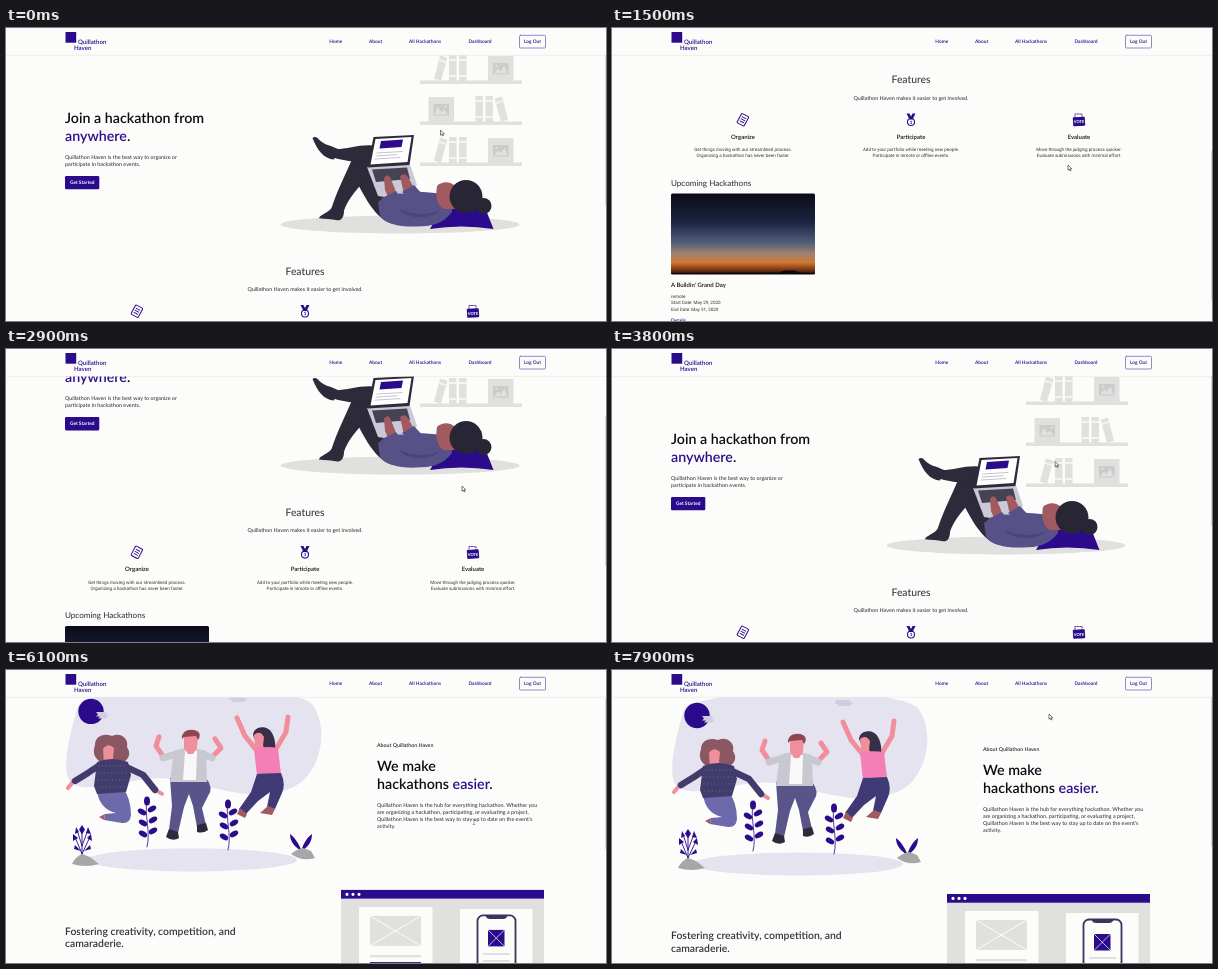
Recreate the animation shown at these times as an HTML page. Size 600x293 px, loop 8 s.

```html
<!DOCTYPE html>
<html lang="en">
<head>
<meta charset="utf-8">
<title>Quillathon Haven</title>
<style>
  html, body { margin: 0; width: 100%; height: 100%; overflow: hidden; background: #fcfcfa; }
  svg { display: block; width: 100%; height: 100%; }
  text { font: 5.4px Lato, sans-serif; fill: #2a2a2e; text-rendering: geometricPrecision; }
  .small { font: 4.55px Roboto, sans-serif; fill: #333; }
  .hero { font-size: 14.25px; font-weight: 600; fill: #0b0b14; }
  .lead { font-size: 10.4px; font-weight: 600; fill: #333338; }
  .title { font-size: 6px; font-weight: 600; fill: #111; }
  .nav { font-size: 4.8px; font-weight: 600; }
  .brand { font-size: 6.1px; font-weight: 600; }
  .mid { text-anchor: middle; }
  .ink, text.ink, tspan.ink { fill: #2b0b8b; }
  .dark { fill: #2d2b3a; }
  .skin { fill: #a05a60; }
  .pink { fill: #f08f9b; }
  .grey { fill: #e0e0df; }
  .lilac { fill: #e5e3f0; }
  .paper { fill: #fcfcfa; }
  .line { fill: none; stroke-linecap: round; stroke-linejoin: round; }
</style>
</head>
<body>
<svg viewBox="0 0 600 293">
  <defs>
    <linearGradient id="dusk" x2="0" y2="1">
      <stop offset="0" stop-color="#0b0b18"/>
      <stop offset=".35" stop-color="#1b2340"/>
      <stop offset=".6" stop-color="#4d5d78"/>
      <stop offset=".74" stop-color="#9c8273"/>
      <stop offset=".85" stop-color="#d07a33"/>
      <stop offset=".94" stop-color="#7c3612"/>
      <stop offset="1" stop-color="#1a0d0c"/>
    </linearGradient>
    <g id="shelf">
      <path class="grey" d="M414 134.500h102v3.500h-102zM443 109h7.500v25.500h-7.500zM453 109h7.500v25.500h-7.500zM434 109.500l7.500 2.200-6.500 23-7-2zM482 110h25.500v24.500h-25.500z"/>
      <path fill="#f3f3f2" d="M443 113h7.500v2h-7.500zM453 113h7.500v2h-7.500zM443 129h7.500v2h-7.500zM453 129h7.500v2h-7.500zM433 113l7.400 2.200-.6 1.800-7.300-2.200z"/>
      <path fill="#cbcbca" d="M487 117h15.500v11.500h-15.500z"/>
      <path class="grey" d="M488 127.500l4-5 2.500 2.500 4-5.500 3 8z"/>
      <circle class="grey" cx="490.500" cy="119.800" r="1.200"/>
    </g>
    <g id="sprig">
      <path class="line" stroke="#2b0b8b" stroke-width=".8" d="M0 50C4 35-3 18 0 3"/>
      <g class="ink">
        <ellipse cy="4" rx="3" ry="4.500"/>
        <ellipse cx="-5" cy="15" rx="4.600" ry="2.700" transform="rotate(30 -5 15)"/>
        <ellipse cx="5" cy="12" rx="4.600" ry="2.700" transform="rotate(-30 5 12)"/>
        <ellipse cx="-4" cy="26" rx="4.600" ry="2.700" transform="rotate(30 -4 26)"/>
        <ellipse cx="6" cy="23" rx="4.600" ry="2.700" transform="rotate(-30 6 23)"/>
        <ellipse cx="-4" cy="37" rx="4.600" ry="2.700" transform="rotate(30 -4 37)"/>
        <ellipse cx="6" cy="34" rx="4.600" ry="2.700" transform="rotate(-30 6 34)"/>
      </g>
    </g>
  </defs>
  <rect class="paper" width="600" height="293"/>

  <g id="home">
    <use href="#shelf" y="-82"/>
    <use href="#shelf" transform="matrix(-1 0 0 1 930 -41)"/>
    <use href="#shelf"/>
    <text class="hero" x="59" y="95">Join a hackathon from</text>
    <text class="hero" x="59" y="112.500"><tspan class="ink">anywhere</tspan>.</text>
    <text x="59" y="131">Quillathon Haven is the best way to organize or</text>
    <text x="59" y="138">participate in hackathon events.</text>
    <rect class="ink" x="59" y="148" width="34.300" height="13.300" rx="1.300"/>
    <text class="nav mid" x="76.200" y="156.400" style="fill:#fff;font-weight:700">Get Started</text>

    <ellipse class="grey" cx="394" cy="196.500" rx="119.500" ry="9"/>
    <path class="ink" d="M424 201L437 178Q455 185 478 177L487.500 201Q455 196 424 201z"/>
    <g class="dark">
      <path d="M347 128C361 127 374 142 380 164L401 182 388 196C371 194 356 166 346 143z"/>
      <path d="M347 129C338 150 330 165 325 182L337.500 184C342 170 352 160 362 149z"/>
      <path d="M327 178L338 183C338 188 336 193 331 192.300 325 191 319 191 313 190.300 314 186 322 186 327 178z"/>
      <path d="M327 121C341 122 354 115 372 118L372 134C355 134 341 134 327 129.500z"/>
      <path d="M306.500 110Q309 108 311.500 110C317 117 324 117 332 121L328 131.500C318 131 311 122 306.500 110z"/>
    </g>
    <path fill="#cbc9d8" d="M361 139L404 136.500 411 157 398 172 372 168z"/>
    <path fill="#454252" d="M366 141.500L401 139.500 404 151 370 154z"/>
    <path fill="#2d2b3a" d="M367.500 109L408 107 403.500 137 361.500 139.500z"/>
    <path fill="#fff" d="M369.500 111L405.500 109 401.500 134 364.500 136.500z"/>
    <path class="ink" d="M375 113L397 111.500 395.500 119 373.500 120.500z"/>
    <path class="line" stroke="#c5c4cd" stroke-width="1" d="M371 125L396 123.500M370 128L391 126.700M369 131L394 129.500"/>
    <path fill="#565187" d="M372 174C379 167 391 164 399 166 411 161 430 166 446 167L446 184C437 196 426 198.500 410 198.500 394 199 379 196 374 188z"/>
    <path fill="#4a4678" d="M391 180C406 187 420 188 434 182 424 192 402 192 391 180z"/>
    <g class="skin">
      <path d="M378 150Q381 145 384 149L389 161 391 170 383 171 379 162z"/>
      <path d="M394 148Q399 144 402 149L408 160 405 168 398 166z"/>
      <path d="M431 158C437 152 445 154 449 158L455 181 438 181Q428 176 431 158z"/>
    </g>
    <path fill="#565187" d="M376 170L390 163 400 178 388 185zM396 164L408 157 419 169 410 178z"/>
    <circle fill="#282635" cx="460" cy="168.500" r="16.500"/>
    <circle fill="#282635" cx="477.500" cy="178" r="8"/>

    <text class="mid" x="299" y="246.700" style="font-size:10.400px">Features</text>
    <text class="mid" x="299" y="263.300">Quillathon Haven makes it easier to get involved.</text>
    <g class="line" stroke="#2b0b8b" transform="rotate(28 131 283)">
      <rect x="127" y="278" width="8" height="10.500" rx=".8" stroke-width="1"/>
      <path stroke-width=".9" d="M129 281h4M129 283.300h4M129 285.600h4"/>
    </g>
    <path class="ink" d="M294.500 277h3l1.500 3 1.500-3h3l-3 6h-3z"/>
    <circle class="line" cx="299" cy="285.500" r="3.500" stroke="#2b0b8b" stroke-width="1.100"/>
    <text class="mid ink" x="299" y="287.200" style="font-size:4.500px;font-weight:800">1</text>
    <rect class="line" x="463" y="277.500" width="7" height="5" stroke="#2b0b8b" stroke-width=".8" stroke-dasharray="1.200 1.200"/>
    <rect class="ink" x="461" y="280.500" width="12" height="9" rx="1" transform="rotate(-4 467 285)"/>
    <text class="mid" x="467" y="286.800" style="font-size:4px;font-weight:800;fill:#fff">VOTE</text>
    <g class="mid">
      <text class="title" x="131" y="302.300">Organize</text>
      <text class="small" x="131" y="314.500">Get things moving with our streamlined process.</text>
      <text class="small" x="131" y="320.800">Organizing a hackathon has never been faster.</text>
      <text class="title" x="299" y="302.300">Participate</text>
      <text class="small" x="299" y="314.500">Add to your portfolio while meeting new people.</text>
      <text class="small" x="299" y="320.800">Participate in remote or offline events.</text>
      <text class="title" x="467" y="302.300">Evaluate</text>
      <text class="small" x="467" y="314.500">Move through the judging process quicker.</text>
      <text class="small" x="467" y="320.800">Evaluate submissions with minimal effort.</text>
    </g>
    <text x="59" y="349" style="font-size:8.100px">Upcoming Hackathons</text>
    <rect fill="url(#dusk)" x="59" y="357" width="144" height="81" rx="1.500"/>
    <path fill="#080610" d="M59 436.500L168 436 172 434H183L187 436 203 436.500V437.500H59z"/>
    <text class="title" x="59" y="450">A Buildin' Grand Day</text>
    <text class="small" x="59" y="461">remote</text>
    <text class="small" x="59" y="467.500">Start Date: May 29, 2020</text>
    <text class="small" x="59" y="474">End Date: May 31, 2020</text>
    <text class="nav ink" x="59" y="485.300">Details</text>
    <text class="title ink" x="59" y="519.300">See more hackathons</text>
  </g>

  <g id="about">
    <g id="jump">
      <path class="lilac" d="M72 40C85 18 280 15 306 38 322 60 316 95 299 113 277 132 250 130 226 126 192 120 170 110 140 113 110 117 70 130 62 112 56 95 66 60 72 40z"/>
      <circle class="ink" cx="85" cy="45.500" r="12.700"/>
      <path fill="#cfcde0" d="M90 46h11l-2 2h4l-3 2h2l-2 2.500H92l2-2h-4l2-2zM224 30h15l-2 2h4l-3 4h-13l2-2h-4z"/>
      <ellipse class="lilac" cx="186" cy="194" rx="105" ry="11.500"/>
      <use href="#sprig" x="141" y="131"/>
      <use href="#sprig" x="222" y="134"/>
      <path class="line" stroke="#2b0b8b" stroke-width=".9" d="M76 190V164M76 188L69 171M76 188L84 171M76 180L71 164M76 180L82 164"/>
      <path class="ink" d="M76 159l3 4.500-3 5-3-5zM70 161l3 5-4 2zM82 161l-2 6 5 1zM67 168l5 4-5 3zM85 168l-4 4 5 3zM69 179l6 6-7-2zM84 179l-6 6 7-2z"/>
      <path class="ink" d="M284 168C288 171 293 177 295.500 185 289 181 284 176 284 168zM306 168C302 171 297 177 295.500 185 302 181 306 176 306 168z"/>
      <path fill="#a7a7a7" d="M66 198Q69 191 76 188L84 191 93 198Q80 202 66 198zM285 188Q291 183 297 182L305 185 309 192Q296 196 285 188z"/>

      <path fill="#8b5762" d="M89 79C89 70 98 67 106 70 115 66 123 73 121 81 126 88 122 96 114 97L95 96Q85 91 89 79z"/>
      <path class="pink" d="M97 83Q102 76 108 82L107 92 110 97 98 98z"/>
      <path class="line" stroke="#f08f9b" stroke-width="4" d="M67 116L62 122M151 125L156 128"/>
      <path fill="#6d69ab" d="M91 124L117 122Q125 133 125 149 124 158 116 157L98 154 99 148 110 147Q93 143 91 124z"/>
      <path class="line" stroke="#423c6d" stroke-width="6.500" d="M94 99L82 107 69 115M120 101L137 109 149 124"/>
      <path fill="#423c6d" d="M91 96Q106 90 122 96L125 109 120 126 91 128 88 120z"/>
      <path class="line" stroke="#77729f" stroke-width=".9" stroke-dasharray=".1 3.500" d="M93 100H120M91 107H122M92 114H121M93 121H119"/>
      <path class="skin" d="M99 148L98 154 93 151z"/>

      <path class="line" stroke="#f08f9b" stroke-width="5" d="M156 89L150 80 153 71M206 91L215 82 209 73"/>
      <path class="line" stroke="#c8c8d0" stroke-width="7" d="M171 88L157 92M197 88L206 92"/>
      <path fill="#59558a" d="M164 112H200Q208 122 202 130L196 142 200 159 191 161 187 140 183 128 178 141 172 167 163 164 166 140z"/>
      <path fill="#c8c8d0" d="M168 85Q183 79 200 85L201 116 164 116z"/>
      <path fill="#f8f8fa" d="M179 85H191L190 114H177z"/>
      <path class="pink" d="M178 68H192L191 82 187 88H182L178 82z"/>
      <path fill="#8e474f" d="M176 73C175 65 184 62 191 65 195 67 194 72 192 74L190 70 178 71z"/>
      <path class="dark" d="M163 163L172 166 173 172Q167 176 160 171zM191 159L200 157 202 164Q197 168 191 166z"/>

      <path class="line" stroke="#f08f9b" stroke-width="5" d="M251 85L239 70 231 52M270 83L280 66 282 51"/>
      <path fill="#382f48" d="M247 69C248 59 262 59 266 67 271 76 270 87 265 92L254 86z"/>
      <path class="pink" d="M248 69Q254 64 258 71L257 80 261 84 253 86 249 80z"/>
      <path fill="#f47fb6" d="M248 83Q258 80 272 82L275 108 251 110z"/>
      <path fill="#3f3975" d="M251 108L275 107Q280 118 276 127L269 143 261 141 264 126 252 135 239 149 233 143 245 126z"/>
      <path class="skin" d="M234 142L241 148 239 152 231 148zM262 140L269 143 266 149 254 147z"/>
    </g>

    <text x="371" y="81" style="font-size:5.250px;font-weight:600">About Quillathon Haven</text>
    <text class="hero" x="371" y="105.400">We make</text>
    <text class="hero" x="371" y="122.900">hackathons <tspan class="ink">easier</tspan>.</text>
    <text x="371" y="141">Quillathon Haven is the hub for everything hackathon. Whether you</text>
    <text x="371" y="147.900">are organizing a hackathon, participating, or evaluating a project,</text>
    <text x="371" y="154.800">Quillathon Haven is the best way to stay up to date on the event's</text>
    <text x="371" y="161.700">activity.</text>

    <text class="lead" x="59" y="269">Fostering creativity, competition, and</text>
    <text class="lead" x="59" y="281.600">camaraderie.</text>
    <path class="ink" d="M59 311Q60 306 64 305.500 61 300 66 299.500 71 300 69 305 72 306 72 309L70 311z"/>
    <circle class="ink" cx="63.500" cy="304" r="2.800"/>
    <path class="ink" d="M175 312C163 304 171 299 175 303.500 179 299 187 304 175 312z"/>
    <text class="small" x="59" y="318">Make new friends by teaming up with other</text>
    <text class="small" x="59" y="324.500">participants.</text>
    <text class="small" x="169" y="318">Have a great time while building</text>
    <text class="small" x="169" y="324.500">something you love.</text>

    <rect class="grey" x="335" y="232" width="203" height="123"/>
    <rect class="ink" x="335" y="224" width="203" height="8.700"/>
    <path class="line" stroke="#fff" stroke-width="3.200" d="M341 228.400h0M347 228.400h0M353 228.400h0"/>
    <path class="paper" d="M353 241h73.500v76h-73.500zM454 243h72.500v91h-72.500z"/>
    <rect class="grey" x="364" y="250" width="51" height="30"/>
    <path class="line" stroke="#fff" stroke-width=".9" d="M364 250l51 30M415 250l-51 30"/>
    <path class="grey" d="M364 289h51v2.300h-51zM364 304h51v2.300h-51z"/>
    <rect class="ink" x="364" y="296.200" width="51" height="2.600"/>
    <rect class="paper" x="471.500" y="249.500" width="38" height="79" rx="5.500" stroke="#38345c" stroke-width="1.800"/>
    <path fill="#38345c" d="M480 249h21v2q-1 2-4 2h-13q-3 0-4-2z"/>
    <rect class="ink" x="482" y="264" width="16.500" height="16.500"/>
    <path class="line" stroke="#fff" stroke-width=".7" d="M482 264l16.500 16.500M498.500 264l-16.500 16.500"/>
    <path class="grey" d="M477 287h27v2h-27zM477 294h27v2h-27zM477 304h20v2h-20z"/>
    <rect class="ink" x="500" y="303.700" width="26" height="2.600"/>
    <path fill="#4a475c" d="M472 339.500h5v5.500h-5zM480 339.500h5v5.500h-5zM488 339.500h5v5.500h-5zM504 339.500h5v5.500h-5z"/>
    <rect class="ink" x="496" y="339.500" width="5" height="5.500"/>

    <path class="grey" d="M319 362q14-3 28 0-14 3-28 0zM384 364q13-3 28 0-13 3-28 0zM508 363q14-3 29 0-14 3-29 0z"/>
    <rect class="ink" x="283" y="331" width="40" height="28.500"/>
    <circle cx="303" cy="345" r="9" fill="#fff"/>
    <circle class="ink" cx="303" cy="342" r="3"/>
    <path class="ink" d="M297 350Q303 344 309 350 303 355 297 350z"/>

    <path class="pink" d="M327 303Q331 298 334 303L334 309 329 312z"/>
    <path class="dark" d="M326 304C325 298 335 298 335 303L331 302z"/>
    <path class="line" stroke="#2d2b3a" stroke-width="3" d="M327 313L321 327M337 313L341 326"/>
    <path class="dark" d="M326 309L336 309 340 320 337 331 342 358 344 361 339 361 333 344 326 361 321 361 328 338 326 325z"/>
    <path fill="#f6f6f8" d="M330 309L333 309 332 322z"/>

    <path class="line" stroke="#5f5a95" stroke-width="3.500" d="M392 309L385 306 382 300M403 309L409 306 412 300"/>
    <path fill="#5f5a95" d="M390 307H405L405 330H391z"/>
    <circle class="dark" cx="397.500" cy="303" r="4.200"/>
    <path class="dark" d="M391 329H405L403 345 402 362 398 363 398 338 395 363 390 363 393 345z"/>

    <path class="line" stroke="#f08f9b" stroke-width="2.500" d="M519 314L512 309 510 306"/>
    <path fill="#6b66aa" d="M519 309L527 309 532 317 529 331 517 331 515 313z"/>
    <circle class="pink" cx="523" cy="305" r="3.300"/>
    <path class="dark" d="M520 303C521 299 529 300 529 306L526 309zM528 302l4-1 1 3-4 1zM517 330H529L528 345 531 360 527 362 523 342 517 361 512 361 517 345z"/>
  </g>

  <rect class="paper" width="600" height="27"/>
  <path stroke="#e9e9e8" stroke-width=".7" d="M0 27.300h600"/>
  <rect class="ink" x="59.500" y="4" width="10.700" height="10.700"/>
  <text class="brand ink" x="72" y="15.500">Quillathon</text>
  <text class="brand ink" x="68" y="21.800">Haven</text>
  <text class="nav ink" x="323.300" y="15.300">Home</text>
  <text class="nav ink" x="363" y="15.300">About</text>
  <text class="nav ink" x="403" y="15.300">All Hackathons</text>
  <text class="nav ink" x="462.500" y="15.300">Dashboard</text>
  <rect class="line" x="513.500" y="7.300" width="26" height="12.700" rx="1" stroke="#6b57b0" stroke-width=".7"/>
  <text class="nav ink mid" x="526.500" y="15.300">Log Out</text>
  <rect id="thumb" x="599.300" width=".7" height="150" fill="#c6c6c6"/>
  <g id="status">
    <rect y="288" width="200" height="5" fill="#080808"/>
    <text x="1.500" y="291.800" style="font:3.600px Roboto,sans-serif;fill:#aaa">https://www.quillathon-haven.tech/about</text>
  </g>
  <path id="arrow" fill="#fff" stroke="#222" stroke-width=".6" d="M0 0V5.200L1.200 4.100 2.100 6 3 5.600 2.200 3.800H3.800z"/>
  <path id="beam" class="line" stroke="#777" stroke-width=".6" d="M-1-2.500h2M0-2.500v5M-1 2.500h2"/>
</svg>
<script>
  const LOOP = 8000, STEP = 100, CLICK = 5100;
  const scrollKeys = [[600, 0], [1200, 156], [1800, 227], [2300, 227], [3300, 0],
                      [6000, 0], [6700, 74], [7000, 74], [7600, 0]];
  const cursorKeys = [[0, 434.5, 102], [600, 456, 137], [3200, 456, 137], [3700, 443, 112.5],
                      [4000, 443, 112.5], [4800, 369, 13], [5100, 369, 13], [5400, 465, 131.5],
                      [5700, 468, 152], [7300, 468, 152], [7800, 437, 44]];
  const $ = id => document.getElementById(id);
  const show = (id, on) => $(id).style.display = on ? '' : 'none';
  const move = (id, x, y) => $(id).setAttribute('transform', `translate(${x} ${y})`);

  // Eased value of column `i` at time t
  function valueAt(keys, t, i) {
    const next = keys.findIndex(key => key[0] > t);
    if (next < 0) return keys.at(-1)[i];
    if (next === 0) return keys[0][i];
    const a = keys[next - 1], b = keys[next];
    const p = (t - a[0]) / (b[0] - a[0]);
    return a[i] + (b[i] - a[i]) * p * p * (3 - 2 * p);
  }

  function draw(now) {
    const t = Math.floor(now % LOOP / STEP) * STEP;
    const scroll = valueAt(scrollKeys, t, 1);
    const x = valueAt(cursorKeys, t, 1), y = valueAt(cursorKeys, t, 2);
    const onAbout = t >= CLICK, overText = t >= 5700 && t < 7300;
    show('home', !onAbout);
    show('about', onAbout);
    show('jump', t >= 5600);
    show('status', t >= 4900 && t < 5700);
    show('arrow', !overText);
    show('beam', overText);
    move('home', 0, -scroll);
    move('about', 0, -scroll);
    move('thumb', 0, 27 + scroll / 2);
    move('arrow', x, y);
    move('beam', x, y);
    requestAnimationFrame(draw);
  }
  requestAnimationFrame(draw);
</script>
</body>
</html>
```
